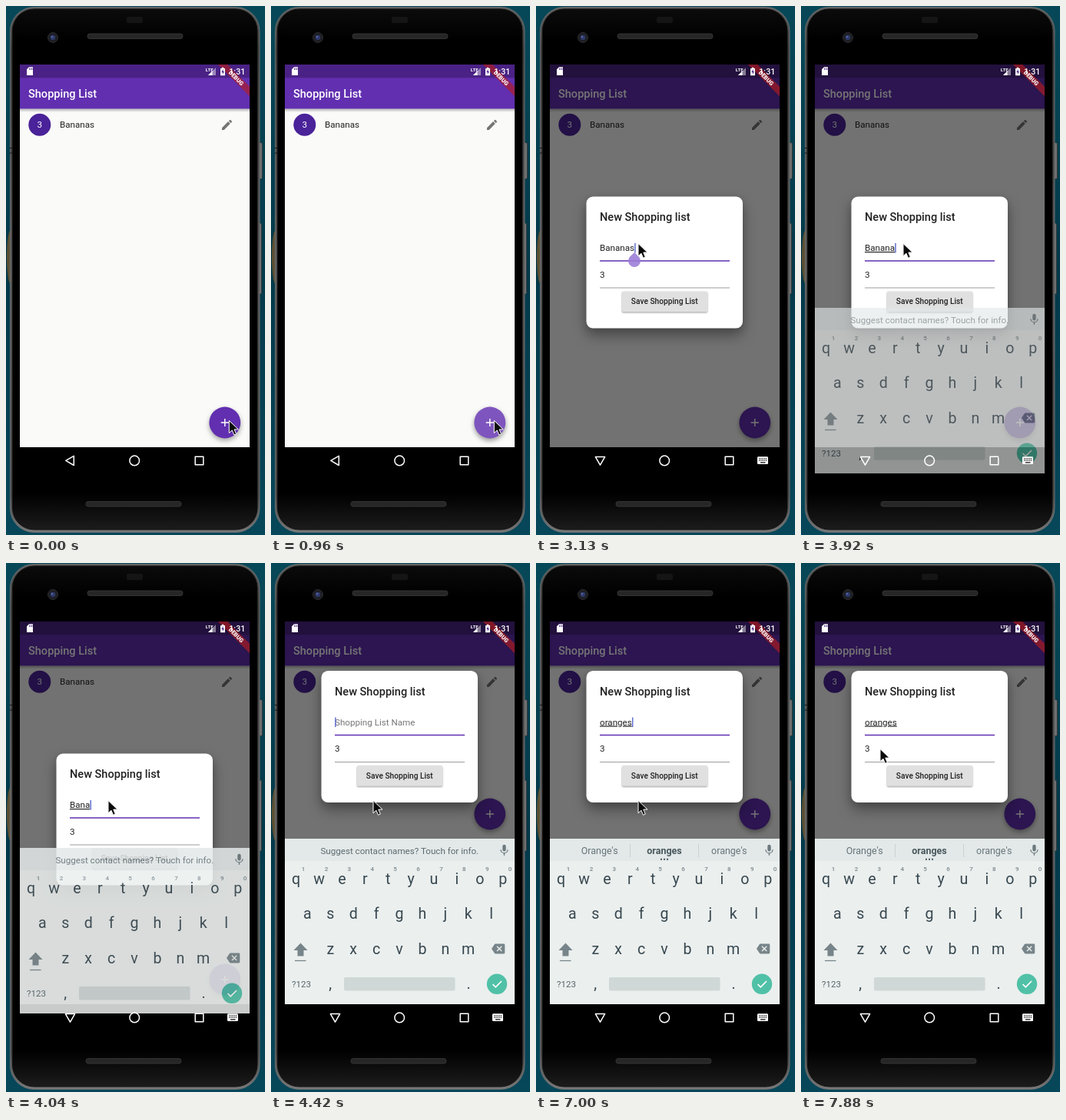
Recreate the animation shown at these times as an HTML page. Size 337 px wide and 687 px high, loop 8000 ms.

```html
<!DOCTYPE html>
<html lang="en">
<head>
<meta charset="utf-8">
<title>Shopping list</title>
<style>
  html, body { margin: 0; width: 100%; height: 100%; overflow: hidden; background: #053f4e; }
  svg { display: block; width: 337px; height: 687px; font-family: Roboto, sans-serif; }
  text { white-space: pre; }
  .title { font-size: 14.55px; font-weight: 500; }
  .body { font-size: 11.64px; }
  .mid { text-anchor: middle; }
  .med { font-weight: 500; }
  .key { font-size: 19.6px; fill: #37474f; text-anchor: middle; }
  .num { font-size: 8px; font-weight: 500; fill: #7b888d; text-anchor: middle; }
  .word { font-size: 12.5px; fill: #66757b; text-anchor: middle; }
  #dialogBox { filter: drop-shadow(0 9px 9px rgba(0,0,0,.32)) drop-shadow(0 3px 5px rgba(0,0,0,.15)); }
  #fab circle { filter: drop-shadow(0 3px 3px rgba(0,0,0,.35)); }
  .button { filter: drop-shadow(0 1px 1px rgba(0,0,0,.4)); }
</style>
</head>
<body>
<svg viewBox="0 0 337 687">
  <defs>
    <linearGradient id="wall" x2="0" y2="1">
      <stop stop-color="#074858"/><stop offset=".5" stop-color="#03394a"/><stop offset="1" stop-color="#07475a"/>
    </linearGradient>
    <linearGradient id="rim" x2="0" y2="1">
      <stop stop-color="#5c5c5c"/><stop offset=".08" stop-color="#3b3b3b"/>
      <stop offset=".5" stop-color="#555"/><stop offset=".93" stop-color="#444"/><stop offset="1" stop-color="#777"/>
    </linearGradient>
    <linearGradient id="glass" x2="0" y2="1">
      <stop stop-color="#0b0b0b"/><stop offset=".06" stop-color="#000"/>
      <stop offset=".93" stop-color="#000"/><stop offset="1" stop-color="#1c1c1c"/>
    </linearGradient>
    <linearGradient id="barShade" x2="0" y2="1">
      <stop stop-opacity=".28"/><stop offset="1" stop-opacity="0"/>
    </linearGradient>
    <clipPath id="screen"><path d="M18 76H317V573H18Z"/></clipPath>
    <clipPath id="panel"><path d="M18 76H317V607H18Z"/></clipPath>
  </defs>

  <!-- Handset -->
  <rect width="337" height="687" fill="url(#wall)"/>
  <ellipse cx="6" cy="326" rx="5" ry="35" fill="#5c5034"/>
  <g fill="#6c6e6f" stroke="#252525" stroke-width=".6">
    <rect x="328" y="177.500" width="5.500" height="47" rx="1.500"/>
    <rect x="328" y="282" width="4.500" height="92" rx="1.500"/>
  </g>
  <path d="M6 1.500H329V30H6ZM5.500 30H330V640H5.500Z" fill="none"/>
  <rect x="5.500" y="1.500" width="324.500" height="682" rx="31" fill="url(#rim)" stroke="#777" stroke-width=".8"/>
  <rect x="8.500" y="4" width="318.500" height="676" rx="28" fill="url(#glass)" stroke="#111" stroke-width="1"/>
  <path d="M5 184.500H8.500M5 191H8.500" stroke="#161616"/>
  <rect x="157" y="14" width="21" height="8" rx="2" fill="#151515"/>
  <rect x="106" y="36" width="124" height="6.500" rx="3" fill="#262626" stroke="#3a3a3a" stroke-width=".8"/>
  <rect x="104" y="643.500" width="124" height="6.500" rx="3" fill="#262626" stroke="#3a3a3a" stroke-width=".8"/>
  <circle cx="61" cy="41" r="6.500" fill="#1d1e22" stroke="#2c2c30"/>
  <circle cx="61" cy="41" r="3.300" fill="#2e3968"/>
  <circle cx="60" cy="40" r="1.300" fill="#5462a0"/>

  <!-- App -->
  <g clip-path="url(#screen)">
    <path d="M18 76H317V573H18Z" fill="#fafaf9"/>
    <path d="M18 133.500H317V138H18Z" fill="url(#barShade)"/>
    <path d="M18 93H317V133.500H18Z" fill="#612fb0"/>
    <path d="M18 76H317V93.300H18Z" fill="#4a2285"/>
    <text class="title" x="29" y="119" fill="#fff">Shopping List</text>
    <circle cx="43.800" cy="154.300" r="14.500" fill="#4a2299"/>
    <text class="body mid" x="43.800" y="158.300" fill="#fff">3</text>
    <text class="body" x="70" y="158.300" fill="#222">Bananas</text>
    <path transform="translate(278.800 145.600) scale(.7275)" fill="#747474" d="M3 17.250V21h3.750L17.810 9.940l-3.750-3.750L3 17.250zM20.710 7.040a1 1 0 0 0 0-1.410l-2.340-2.340a1 1 0 0 0-1.410 0l-1.830 1.830 3.750 3.750z"/>
    <g id="fab">
      <circle cx="284.800" cy="541" r="20.400" fill="#612fb0"/>
      <circle id="splash" cx="284.800" cy="541" r="20.400" fill="#fff" opacity="0"/>
      <path d="M279.700 541H289.900M284.800 535.900V546.100" stroke="#fff" stroke-width="1.450"/>
    </g>
    <path id="scrim" d="M18 76H317V573H18Z" opacity=".54"/>

    <g id="dialog">
      <rect id="dialogBox" x="65.500" y="247.500" width="203.500" height="171" rx="8.700" fill="#fff"/>
      <text class="title" x="83" y="279" fill="#212121">New Shopping list</text>
      <text id="hint" class="body" x="83" y="318" fill="#777">Shopping List Name</text>
      <text id="name" class="body" x="83" y="318" fill="#222"></text>
      <path id="line" d="M83 331H252"/>
      <text class="body" x="83" y="352.800" fill="#222">3</text>
      <path d="M83 366H252" stroke="#8c8c8c" stroke-width=".85"/>
      <rect class="button" x="112" y="370.700" width="111" height="26.500" rx="1.500" fill="#e0e0e0"/>
      <text class="med mid" x="167.300" y="387.300" font-size="10.180" fill="#222">Save Shopping List</text>
      <path id="caret" d="M0 308V320.500" stroke="#5c6bd0" stroke-width="1.450"/>
      <path id="handle" d="M128 320L134 325.800A8 8 0 1 1 122 325.800Z" fill="#9a7bd6" opacity=".88"/>
    </g>
    <g transform="translate(317 76) rotate(45)">
      <path d="M-29.100 20.400H29.100V29.100H-29.100Z" fill="#b71c1c" opacity=".627"/>
      <text class="mid" y="27.400" font-size="7.420" font-weight="900" fill="#fff">DEBUG</text>
    </g>
  </g>

  <!-- Status icons -->
  <g fill="#fff">
    <path d="M27 82.300L30 79.300H35V90H27Z"/>
    <path d="M30.500 80.500V83M32.300 80.500V83M34 80.500V83" stroke="#4a2285" stroke-width=".8"/>
    <path d="M273 80V90H263Z" opacity=".45"/>
    <path d="M268.500 84.500V90H263Z"/>
    <text x="259.800" y="84.500" font-size="6" font-weight="700" textLength="">LTE</text>
    <path d="M279 81H280.800V79.700H283.200V81H285V90.300H279Z"/>
    <path d="M282.600 82L280.300 86H281.800V89L283.900 85H282.600Z" fill="#4a2285"/>
    <text class="med" x="290.300" y="89" font-size="10.600">1:31</text>
  </g>

  <!-- Keyboard -->
  <g clip-path="url(#panel)">
    <g id="keyboard">
      <path d="M18 358H317V573H18Z" fill="#ebefee"/>
      <path d="M18 358H317V387H18Z" fill="#e3e8e8"/>
      <text id="notice" class="body mid" x="167.300" y="378" fill="#5b6a70">Suggest contact names? Touch for info.</text>
      <g id="words">
        <text class="word" x="82.700" y="378.300"></text>
        <text class="word" x="167" y="378.300" style="font-weight:700;fill:#48585e"></text>
        <text class="word" x="251.300" y="378.300"></text>
        <path d="M122.500 365V382M211.500 365V382" stroke="#cbd2d2"/>
        <path d="M162 384.800h2M166 384.800h2M170 384.800h2" stroke="#48585e" stroke-width="2"/>
      </g>
      <path transform="translate(294.700 364.300) scale(.73)" fill="#6b797e" d="M12 14a3 3 0 0 0 3-3V5a3 3 0 0 0-6 0v6a3 3 0 0 0 3 3zm5.300-3a5.300 5.300 0 0 1-10.600 0H5a7 7 0 0 0 6 6.700V21h2v-3.300a7 7 0 0 0 6-6.700z"/>
      <g id="keys"></g>
      <path d="M38.500 493.500L47.500 503H42.500V510.500H34.500V503H29.500Z" fill="#77858a"/>
      <path d="M31 516.500H45.500" stroke="#77858a" stroke-width="1.300"/>
      <path transform="translate(287 492.300) scale(.72)" fill="#77858a" d="M22 3H7a2 2 0 0 0-1.600.9L0 12l5.400 8.100A2 2 0 0 0 7 21h15a2 2 0 0 0 2-2V5a2 2 0 0 0-2-2zm-3 12.600L17.600 17 14 13.400 10.400 17 9 15.600l3.600-3.600L9 8.400 10.400 7 14 10.600 17.600 7 19 8.400 15.400 12z"/>
      <text x="27" y="551" font-size="11.600" fill="#56666c">?123</text>
      <rect x="95" y="538" width="144.500" height="17.500" rx="2" fill="#cfd8d6"/>
      <circle cx="294" cy="546.800" r="13.200" fill="#50c1a7"/>
      <path d="M288.500 547L292.300 550.800L300 543" fill="none" stroke="#fff" stroke-width="1.700"/>
    </g>
  </g>

  <!-- Navigation -->
  <g fill="none" stroke="#fff" stroke-width="1.500" stroke-linejoin="round">
    <path id="back" d="M77.800 590.400L88.300 584.300V596.500Z"/>
    <circle cx="167.200" cy="590.400" r="6.300"/>
    <rect x="246.200" y="585.300" width="10.600" height="10.400"/>
    <g id="imeIcon">
      <rect x="288" y="585.300" width="14" height="9.800" rx="1.300" fill="#fff" stroke="none"/>
      <path d="M290 587.800H300.500M290 590.200H300.500" stroke="#000" stroke-width="1.200" stroke-dasharray="1.200 1"/>
      <path d="M292 592.900H298.500" stroke="#000" stroke-width="1.200"/>
    </g>
  </g>

  <path id="pointer" d="M0 0V16.300L3.900 12.700L6.500 18.800L9.300 17.500L6.800 11.600H12Z" fill="#0b0b0b" stroke="#fff" stroke-width="1"/>
</svg>
<script>
const LOOP = 8000;
const $ = id => document.getElementById(id);
const show = (id, on) => $(id).setAttribute('visibility', on ? 'visible' : 'hidden');
const attr = (id, key, value) => $(id).setAttribute(key, value);

function addText(cls, x, y, str) {
  const el = document.createElementNS('http://www.w3.org/2000/svg', 'text');
  el.setAttribute('class', cls);
  el.setAttribute('x', x);
  el.setAttribute('y', y);
  el.textContent = str;
  $('keys').append(el);
}
[['qwertyuiop', 32.6, 417], ['asdfghjkl', 47.4, 462.3], ['zxcvbnm', 77.3, 508]].forEach(([row, x, y]) =>
  [...row].forEach((c, i) => addText('key', x + i * 29.9, y, c)));
[...'1234567890'].forEach((c, i) => addText('num', 42 + i * 29.9, 400, c));
addText('key', 77.3, 552.5, ',');
addText('key', 257, 552.5, '.');

// Each step holds until the next; values carry over.
const STEPS = [
  [0, { at: [290.3, 538.3], press: 0, open: 0, focus: 0, turn: 0, ime: 0, caret: 0, handle: 0,
        kb: null, lift: 0, text: 'Bananas', under: 0, words: null }],
  [960, { press: 1 }],
  [1290, { press: 0, open: 1 }],
  [1790, { at: [205, 400] }],
  [1880, { at: [161.5, 321.5] }],
  [2040, { at: [150, 316] }],
  [2130, { at: [140, 311] }],
  [2210, { at: [133, 308.5] }],
  [2920, { focus: 1, caret: 1, turn: 30, ime: 1 }],
  [2990, { turn: 60 }],
  [3060, { turn: 90, handle: 1 }],
  [3460, { caret: 0 }],
  [3790, { kb: [90, .2], handle: 0, caret: 1, under: 1 }],
  [3860, { kb: [60, .4] }],
  [3920, { kb: [34, .62], text: 'Banana' }],
  [4000, { kb: [12, .85], text: 'Bana' }],
  [4080, { kb: [0, 1], text: 'Ban' }],
  [4330, { lift: .7, text: '' }],
  [4420, { lift: 1 }],
  [5210, { caret: 0 }],
  [5750, { caret: 1 }],
  [5920, { text: 'o', under: 0 }],
  [6170, { text: 'or' }],
  [6290, { text: 'ora', under: 1, words: ['Orange', 'or a', 'oral'] }],
  [6380, { text: 'oran', words: ["Orange's", 'orange', 'oranges'] }],
  [6540, { text: 'orang', words: ['Orange', 'orange', 'oranges'] }],
  [6750, { text: 'orange', words: ['Orange', 'orange', 'oranges'] }],
  [6920, { text: 'oranges', words: ["Orange's", 'oranges', "orange's"] }],
  [7380, { at: [148, 306.5] }],
  [7630, { at: [136, 288], caret: 0 }],
  [7700, { at: [120, 263] }],
  [7750, { at: [109, 249] }],
  [7810, { at: [104.5, 243] }],
  [7880, { at: [103, 241.5] }]
];

function render(t) {
  const s = Object.assign({}, ...STEPS.filter(([from]) => from <= t).map(([, props]) => props));
  attr('pointer', 'transform', `translate(${s.at})`);
  attr('splash', 'opacity', s.press * .18);
  attr('fab', 'transform', `translate(0 ${-215 * s.lift})`);
  attr('dialog', 'transform', `translate(0 ${-107.5 * s.lift})`);
  show('scrim', s.open);
  show('dialog', s.open);

  $('name').textContent = s.text;
  $('name').style.textDecoration = s.under ? 'underline' : 'none';
  const end = s.text ? $('name').getComputedTextLength() : 0;
  attr('caret', 'transform', `translate(${83.9 + end})`);
  show('caret', s.open && s.caret);
  show('handle', s.open && s.handle);
  show('hint', s.open && !s.text);
  attr('line', 'stroke', s.focus ? '#612fb0' : '#8c8c8c');
  attr('line', 'stroke-width', s.focus ? 1.46 : .85);

  attr('back', 'transform', `rotate(${-s.turn} 83.5 590.4)`);
  show('imeIcon', s.ime);
  show('keyboard', s.kb);
  if (s.kb) {
    attr('keyboard', 'transform', `translate(0 ${s.kb[0]})`);
    attr('keyboard', 'opacity', s.kb[1]);
  }
  show('notice', s.kb && !s.words);
  show('words', s.kb && s.words);
  if (s.words) document.querySelectorAll('.word').forEach((el, i) => { el.textContent = s.words[i]; });
}

const start = performance.now();
let last = -1;
function tick() {
  const t = (performance.now() - start) % LOOP;
  const step = STEPS.filter(([from]) => from <= t).length;
  if (step !== last) render(t);
  last = step;
  requestAnimationFrame(tick);
}
tick();
</script>
</body>
</html>
```
